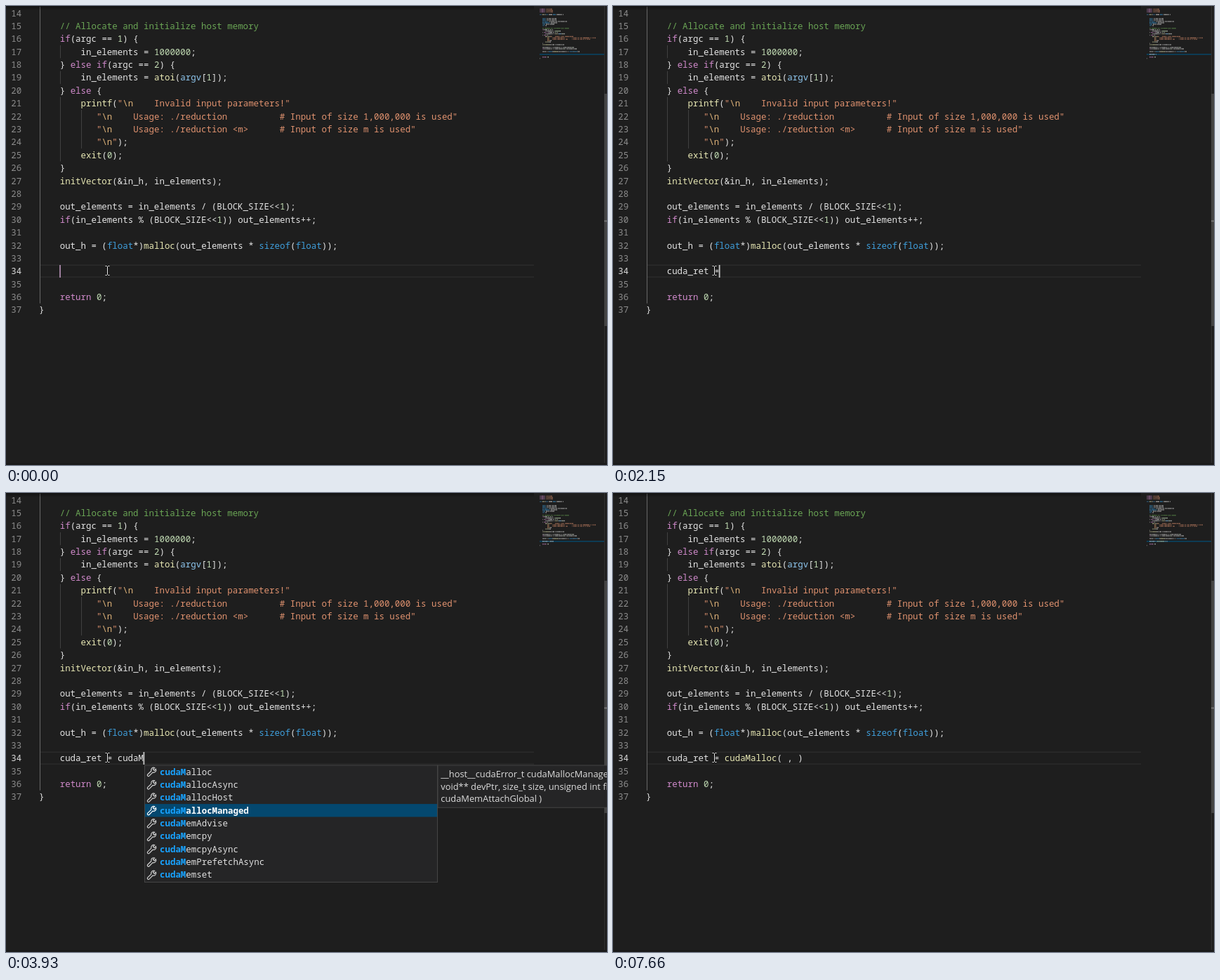
Recreate the animation shown at these times as an HTML page with a canvas. Size 856x654 px, loop 8 s.

```html
<!DOCTYPE html>
<html lang="en">
<head>
<meta charset="utf-8">
<title>Code completion</title>
<style>
  html, body { margin: 0; width: 100%; height: 100%; overflow: hidden; background: #1e1e1e; }
  canvas { display: block; }
</style>
</head>
<body>
<canvas id="stage" width="856" height="654"></canvas>
<script>
const ctx = document.getElementById('stage').getContext('2d');
const W = 856, H = 654, LOOP = 8000;
const LEFT = 46.9, CHAR = 7.46, LINE = 18.39, EDIT = 34;
const MONO = '12.43px "Noto Sans Mono", monospace';
const SANS = '12.85px "Open Sans", sans-serif';
const COLORS = {
  d: '#e4e4e4', k: '#d08acb', b: '#3f9fdc', c: '#6aa555', s: '#e0926f',
  e: '#e0b47a', n: '#c2dcb4', f: '#e8e8b4', v: '#8fc8f0'
};

// "^x" switches to colour x; the list starts at line 1.
const CODE = String.raw`^k#include ^s<stdio.h>
^k#include ^s<stdlib.h>
^k#include ^s<stdint.h>

^bint ^fmain^d(^bint^d argc, ^bchar^d *argv[]) {


    ^bfloat^d *in_h, *out_h;
    ^bfloat^d *in_d, *out_d;
    ^bunsigned^d in_elements, out_elements;
    ^bcudaError_t^d cuda_ret;
    ^bdim3^d grid, block;
    ^bint^d i;

    ^c// Allocate and initialize host memory
    ^kif^d(argc == ^n1^d) {
        in_elements = ^n1000000^d;
    } ^kelse if^d(argc == ^n2^d) {
        in_elements = ^fatoi^d(^vargv^d[^n1^d]);
    } ^kelse^d {
        ^fprintf^d(^s"^e\n^s    Invalid input parameters!"
           ^s"^e\n^s    Usage: ./reduction          # Input of size 1,000,000 is used"
           ^s"^e\n^s    Usage: ./reduction <m>      # Input of size m is used"
           ^s"^e\n^s"^d);
        ^fexit^d(^n0^d);
    }
    ^finitVector^d(&in_h, in_elements);

    out_elements = in_elements / (BLOCK_SIZE<<^n1^d);
    ^kif^d(in_elements % (BLOCK_SIZE<<^n1^d)) out_elements++;

    out_h = (^bfloat^d*)^fmalloc^d(out_elements * ^bsizeof^d(^bfloat^d));



    ^kreturn^d ^n0^d;
}`.split('\n');

const MALLOCS = ['Malloc', 'MallocAsync', 'MallocHost', 'MallocManaged'];
const MEMS = ['MemAdvise', 'Memcpy', 'MemcpyAsync', 'MemPrefetchAsync', 'Memset'];
const LISTS = {
  all: ['GetDeviceFlags', 'GetDeviceProperties', 'HostAlloc', ...MALLOCS, ...MEMS],
  mem: [...MALLOCS, ...MEMS],
  near: [...MALLOCS, 'MemAdvise', 'MemcpyAsync', 'MemPrefetchAsync'],
  malloc: MALLOCS
};
const DOCS = {
  Malloc: ['__host____device__cudaError_t cudaMalloc (', 'void** devPtr, size_t size )'],
  MallocManaged: ['__host__cudaError_t cudaMallocManaged (',
    'void** devPtr, size_t size, unsigned int flags =', 'cudaMemAttachGlobal )']
};

const RET = 'cuda_ret = ';
const M = 'MallocManaged';
const popup = (col, word, list, pick = M, bar = false) => ({ col, word, list, pick, bar });
const first = (word, bar) => popup(4, word, 'all', M, bar);
const second = (word, list = 'all', pick, bar) => popup(15, word, list, pick, bar);

// [start ms, typed text, popup, caret hidden]
const STEPS = [
  [0, ''],
  [130, 'c'],
  [200, 'c', first('c')],
  [270, 'cu', first('cu')],
  [340, 'cud', first('cud', true)],
  [470, 'cuda', first('cuda')],
  [540, 'cuda', first('cuda', true)],
  [1020, 'cuda_'],
  [1220, 'cuda_r'],
  [1350, 'cuda_re'],
  [1480, 'cuda_ret'],
  [1750, 'cuda_ret '],
  [2150, 'cuda_ret ='],
  [2350, RET],
  [2730, RET + 'c'],
  [2800, RET + 'c', second('c')],
  [2920, RET + 'cu', second('cu')],
  [2990, RET + 'cu', second('cu', 'all', M, true)],
  [3190, RET + 'cud', second('cud', 'all', M, true)],
  [3260, RET + 'cuda', second('cuda', 'all', M, true)],
  [3720, RET + 'cudaM', second('cuda', 'all', M, true)],
  [3790, RET + 'cudaM', second('cuda', 'all', '', true)],
  [3930, RET + 'cudaM', second('cudaM', 'mem')],
  [4210, RET + 'cudaMa', second('cudaMa', 'near')],
  [4500, RET + 'cudaMal', second('cudaMal', 'malloc')],
  [4960, RET + 'cudaMal', second('cudaMal', 'malloc'), true],
  [5420, RET + 'cudaMal', second('cudaMal', 'malloc')],
  [5950, RET + 'cudaMal', second('cudaMal', 'malloc'), true],
  [6080, RET + 'cudaMal', second('cudaMal', 'malloc', 'Malloc'), true],
  [6410, RET + 'cudaMal', second('cudaMal', 'malloc', 'Malloc')],
  [6940, RET + 'cudaMal', second('cudaMal', 'malloc', 'Malloc'), true],
  [7200, RET + '^fcudaMalloc^d( , )'],
  [7660, RET + '^fcudaMalloc^d( , )', null, true]
];

const WRENCH = new Path2D('M11 1.1 8.9 3.3l1.8 1.8 2.2-2.1a3.6 3.6 0 0 1-4.5 4.7L3.4 12.8' +
  'a1.55 1.55 0 0 1-2.2-2.2L6.3 5.6a3.6 3.6 0 0 1 4.7-4.5z');

const colX = col => LEFT + col * CHAR;
const lineTop = n => 368.6 + (n - EDIT) * LINE;
const baseline = n => lineTop(n) + 13.7;

function rect(x, y, w, h, color) {
  ctx.fillStyle = color;
  ctx.fillRect(x, y, w, h);
}

function text(str, x, y, color, font = MONO) {
  ctx.font = font;
  ctx.fillStyle = color;
  ctx.fillText(str, x, Math.round(y));
}

// Calls fn(text, column, colour) for each coloured run.
function eachRun(line, fn) {
  let col = 0;
  ('^d' + line).split('^').slice(1).forEach(part => {
    const run = part.slice(1);
    if (run) fn(run, col, COLORS[part[0]]);
    col += run.length;
  });
  return col;
}

function drawMinimap(lines) {
  rect(760, 68, 92, 1.8, '#0b3f5a');
  lines.forEach((line, i) => eachRun(line, (run, col, color) => {
    for (let j = 0; j < run.length; j++) {
      if (run[j] === ' ') continue;
      ctx.globalAlpha = 0.35 + (run.charCodeAt(j) % 5) * 0.07;
      rect(760 + col + j, 3.8 + i * 1.95, 1, 1.4, color);
    }
  }));
  ctx.globalAlpha = 1;
}

function drawGuides() {
  const guide = (col, from, to, color) =>
    rect(Math.round(colX(col) + 0.6), lineTop(from), 1, (to - from + 1) * LINE, color);
  guide(0, 14, 36, '#686868');
  [[17, 17], [19, 19], [21, 25]].forEach(([a, b]) => guide(4, a, b, '#404040'));
  guide(8, 22, 24, '#404040');
}

function drawEditor(lines) {
  rect(0, 0, W, H, '#1e1e1e');
  rect(48, 368.5, 704, 1.5, '#2a2a2a');
  rect(48, 385.4, 704, 1.5, '#2a2a2a');
  drawGuides();
  for (let n = 14; n <= lines.length; n++) {
    text(String(n), 7.2, baseline(n), n === EDIT ? '#dadada' : '#8c8c8c');
    eachRun(lines[n - 1], (run, col, color) => text(run, colX(col), baseline(n), color));
  }
  const shade = ctx.createLinearGradient(0, 0, 0, 6);
  shade.addColorStop(0, 'rgba(0,0,0,.4)');
  shade.addColorStop(1, 'rgba(0,0,0,0)');
  rect(0, 0, 752, 6, shade);
  drawMinimap(lines);
  rect(852, 0, 1, 651, '#303030');
  rect(852, 125, 4, 331, '#434343');
  rect(852, 305.5, 4, 1.8, '#777');
  rect(0, 651, W, 3, '#1a1a1a');
}

function frame(x, y, w, h) {
  rect(x, y, w, h, '#454545');
  rect(x + 1, y + 1, w - 2, h - 2, '#252526');
}

function drawLabel(label, word, x, y, picked) {
  let hit = 0;
  [...label].forEach((ch, i) => {
    const match = hit < word.length && ch.toLowerCase() === word[hit].toLowerCase();
    if (match) hit++;
    text(ch, x + i * CHAR, y, match ? '#18a3ff' : picked ? '#fff' : '#e0e0e0',
      match || picked ? 'bold ' + MONO : MONO);
  });
}

function drawPopup({ col, word, list, pick, bar }) {
  const names = LISTS[list], long = list === 'all';
  const x = Math.round(colX(col + word.length) + 0.4), y = 387.5, w = 418;
  const row0 = long ? 399.2 : 397.2;
  frame(x, y, w, long ? 223.5 : names.length * LINE + 2);
  names.forEach((name, i) => {
    const mid = row0 + i * 18.36, picked = name === pick;
    if (picked) rect(x + 1, mid - 9.2, w - 2, LINE, '#04486f');
    ctx.save();
    ctx.translate(x + 3.6, mid - 6.8);
    ctx.strokeStyle = picked ? '#fff' : '#cfcfcf';
    ctx.lineWidth = 1.2;
    ctx.stroke(WRENCH);
    ctx.restore();
    drawLabel('cuda' + name, word, x + 22, mid + 4.3, picked);
  });

  const doc = DOCS[pick || M];
  frame(x + w - 0.5, y, 321, doc.length * 17.4 + 9);
  doc.forEach((str, i) => text(str, x + w + 4.3, 405.3 + i * 17.4, '#dcdcdc', SANS));
  if (bar) rect(x + w - 10, 469, 10, 142, 'rgba(121,121,121,.5)');
}

function drawPointer() {
  const beam = new Path2D('M141.5 370.5h2l1 1 1-1h2M144.5 371v11.5M141.5 383.5h2l1-1 1 1h2');
  ctx.strokeStyle = '#111';
  ctx.lineWidth = 2.6;
  ctx.stroke(beam);
  ctx.strokeStyle = '#eee';
  ctx.lineWidth = 1;
  ctx.stroke(beam);
}

function draw(ms) {
  const [, typed, list, hidden] = STEPS.filter(step => step[0] <= ms).pop();
  const lines = CODE.slice();
  lines[EDIT - 1] = '    ' + typed;
  drawEditor(lines);
  if (list) drawPopup(list);
  if (!hidden) {
    const col = eachRun(lines[EDIT - 1], () => {});
    rect(colX(col) - 0.6, 369, 1.8, 18, typed ? '#c4c4c4' : '#aa88aa');
  }
  drawPointer();
}

function tick(now) {
  draw(now % LOOP);
  requestAnimationFrame(tick);
}
draw(0);
requestAnimationFrame(tick);
</script>
</body>
</html>
```
